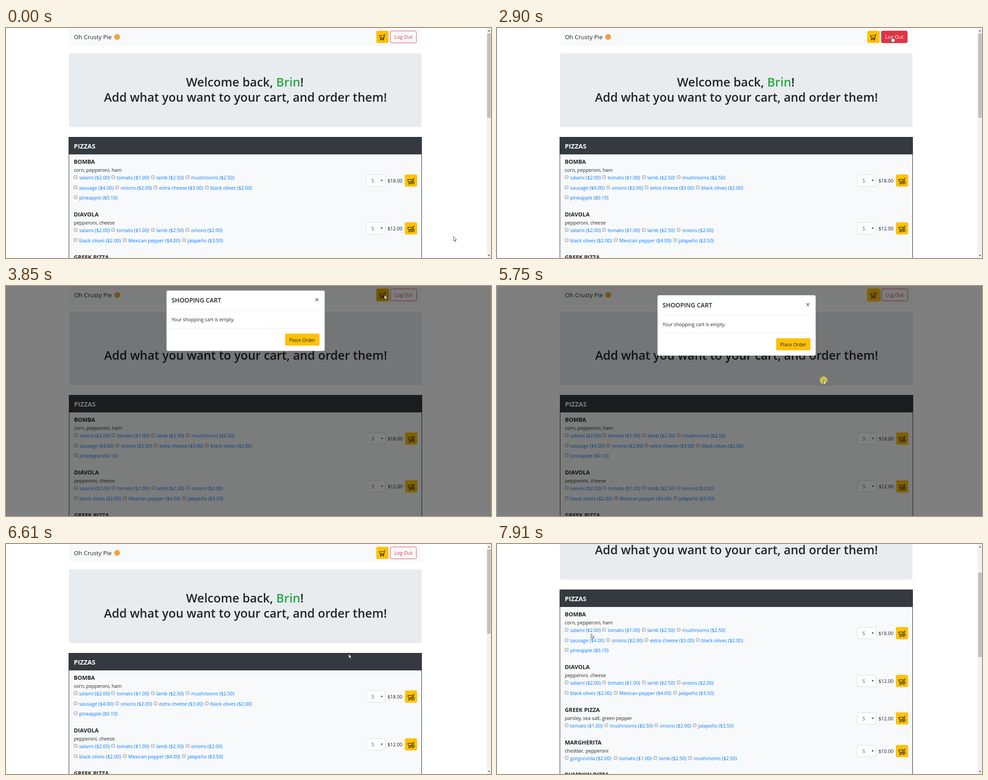
Recreate the animation shown at these times as an HTML page. Size 1087 by 515 pixels, loop 7990 ms.

```html
<!DOCTYPE html>
<html lang="en">
<head>
<meta charset="utf-8">
<title>Pizza order page</title>
<style>
  html, body { margin: 0; width: 100%; height: 100%; overflow: hidden; background: #fff; }
  svg { display: block; }
  text { font-family: "Open Sans", "Noto Sans", sans-serif; white-space: pre; }
</style>
</head>
<body>
<svg id="stage" width="1087" height="515" viewBox="0 0 1087 515"></svg>
<script>
const LOOP = 7990;
const INK = '#212529', LINK = '#007bff', YELLOW = '#ffc107', RED = '#dc3545';

// Each topping is [text x, label]; each inner list is one row.
const MENU = [
  { name: 'BOMBA', desc: 'corn, pepperoni, ham', price: '$18.00', rows: [
    [[164, 'salami ($2.00)'], [248, 'tomato ($1.00)'], [337, 'lamb ($2.50)'], [415, 'mushrooms ($2.50)']],
    [[164, 'sausage ($4.00)'], [257, 'onions ($2.00)'], [343, 'extra cheese ($3.00)'], [458, 'black olives ($2.00)']],
    [[164, 'pineapple ($0.10)']]] },
  { name: 'DIAVOLA', desc: 'pepperoni, cheese', price: '$12.00', rows: [
    [[164, 'salami ($2.00)'], [248, 'tomato ($1.00)'], [337, 'lamb ($2.50)'], [415, 'onions ($2.00)']],
    [[164, 'black olives ($2.00)'], [274, 'Mexican pepper ($4.00)'], [407, 'jalapeño ($3.50)']]] },
  { name: 'GREEK PIZZA', desc: 'parsley, sea salt, green pepper', price: '$12.00', rows: [
    [[164, 'tomato ($1.00)'], [253, 'mushrooms ($2.50)'], [365, 'onions ($2.00)'], [451, 'jalapeño ($3.50)']]] },
  { name: 'MARGHERITA', desc: 'cheddar, pepperoni', price: '$10.00', rows: [
    [[164, 'gorgonzola ($2.00)'], [274, 'tomato ($1.00)'], [363, 'lamb ($2.50)'], [441, 'mushrooms ($2.50)']]] },
  { name: 'PUMPKIN PIZZA', desc: '', price: '', rows: [] }
];

const text = (x, y, str, { size = 10.7, fill = INK, weight = 400, anchor = 'start', id = '' } = {}) =>
  `<text id="${id}" x="${x}" y="${y}" font-size="${size}" fill="${fill}" font-weight="${weight}" text-anchor="${anchor}">${str}</text>`;
const rect = (x, y, w, h, fill, extra = '') =>
  `<rect x="${x}" y="${y}" width="${w}" height="${h}" fill="${fill}" ${extra}/>`;

const cartIcon = (x, y) => `<g transform="translate(${x} ${y})" fill="none" stroke="${INK}" stroke-width="1.2">
  <path d="M7.3-6H5L3 3.8H-5M-6.5-3.5H4.4L3.4 1.4H-5Z"/><circle cx="-3.8" cy="5.8" r=".9"/><circle cx="1.8" cy="5.8" r=".9"/></g>`;

const cartPlusIcon = (x, y) => `<g transform="translate(${x} ${y})" fill="none" stroke="${INK}" stroke-width="1.2">
  <path d="M8-6H5.8L5-2M-7.5-3.8H5.2M-7.5-3.8L-5.8 1.4H0M-5.5 4H0"/>
  <circle cx="-4" cy="6" r=".9"/><circle cx="3.6" cy="2.4" r="3.7"/><path d="M1.6 2.4H5.6M3.6 .4V4.4"/></g>`;

function topping(x, y, label) {
  return rect(x - 11.5, Math.round(y) - 8.5, 7, 7, '#e6e6e6', 'rx="1" stroke="#999"') + text(x, y, label, { fill: LINK });
}

function menuItem(item, y) {
  const middle = Math.round(y + 4.1 + 11.4 * item.rows.length);
  let out = text(152, y, item.name, { size: 12.6, weight: 700 }) + text(152, y + 18, item.desc);
  item.rows.forEach((row, i) => {
    for (const [x, label] of row) out += topping(x, y + 35 + 22.8 * i, label);
  });
  if (!item.price) return out;
  return out +
    rect(807.5, middle - 13.5, 42, 26, '#fff', 'rx="3" stroke="#ced4da" stroke-width=".8"') +
    text(819, middle + 4.3, 'S', { fill: '#495057' }) +
    `<path d="M839.8 ${middle - 2}h4.6l-2.3 3.6z" fill="#343a40"/>` +
    text(855, middle + 4.3, item.price) +
    rect(894, middle - 14, 27.4, 27.2, YELLOW, 'rx="3"') + cartPlusIcon(907.7, middle + 1);
}

function menu() {
  let y = 303.7, out = '';
  for (const item of MENU) {
    out += menuItem(item, y);
    y += 50 + 22.8 * item.rows.length;
  }
  return out;
}

const page = `<g id="page">
  ${rect(141, 0, 790.5, 40, '#f8f9fa')}
  ${text(152.2, 25.3, 'Oh Crusty Pie', { size: 13.4 })}
  <circle cx="249" cy="20" r="6.5" fill="#f0a33c"/>
  ${rect(829.2, 5.2, 29.4, 29.4, 'none', `id="ring" rx="4" stroke="${YELLOW}" stroke-opacity=".5" stroke-width="2.2"`)}
  ${rect(830, 6.2, 27.5, 27.3, YELLOW, 'id="cart" rx="3"')}${cartIcon(843.7, 20.5)}
  ${rect(861.4, 6.6, 58.4, 26.6, RED, `id="logout" rx="3" stroke="${RED}" stroke-width=".9"`)}
  ${text(890.6, 24.3, 'Log Out', { size: 11, anchor: 'middle', id: 'logoutText' })}
  ${rect(141, 57, 790.5, 165, '#e9ecef', 'rx="4"')}
  ${text(403.6, 131, 'Welcome back, <tspan fill="#28a745">Brin</tspan>!', { size: 27, weight: 600 })}
  ${text(536.5, 165, 'Add what you want to your cart, and order them!', { size: 26.9, weight: 600, anchor: 'middle' })}
  ${rect(141, 244.5, 790.5, 700, '#f8f9fa', 'stroke="#212529"')}
  ${rect(141, 244.5, 790.5, 38, '#343a40', 'stroke="#212529" stroke-width=".8"')}
  ${text(152, 269.6, 'PIZZAS', { size: 14.4, weight: 700, fill: '#fff' })}
  ${menu()}</g>`;

const scrollbar = `<g id="scrollbar">${rect(1077.5, 0, 9.5, 515, '#f1f1f1')}
  ${rect(1078.3, 12, 8.2, 189, '#c1c1c1', 'id="thumb"')}
  <path d="M1080 7.5h5l-2.5-3zM1080 508h5l-2.5 3z" fill="#505050"/></g>`;

const modal = `<g id="modal">
  ${rect(359.6, 0, 354.8, 135.4, '#fff', 'rx="3.5" stroke="#000" stroke-opacity=".2" stroke-width=".7"')}
  ${text(371, 27.4, 'SHOOPING CART', { size: 13.8, weight: 600 })}
  ${text(696.5, 27, '×', { size: 17, weight: 700, fill: '#7f7f7f', anchor: 'middle' })}
  ${rect(360, 44, 354, .8, '#e9ecef')}
  ${text(371, 69.4, 'Your shopping cart is empty.')}
  ${rect(360, 84, 354, .8, '#e9ecef')}
  ${rect(625.6, 96.4, 77, 27, YELLOW, 'rx="3"')}
  ${text(664, 114.8, 'Place Order', { anchor: 'middle' })}</g>`;

const pointer = `<g id="pointer">
  <circle id="press" cy="0" r="8.7" fill="#ffee30" fill-opacity=".62"/>
  <path id="arrow" d="M0 0V9.6L2.2 7.6L3.9 11.3L5.5 10.6L3.9 7.1H6.8Z" fill="#fff" stroke="#222" stroke-width=".8"/>
  <path id="hand" d="M-1.1 6V.3Q0-1 1.1.3V4Q2.3 3.3 3 4.3Q4.2 3.8 4.7 4.8Q6 4.5 6 5.8V8.4L4.9 11.7H-.7L-3.5 7.4Q-3.4 5.6-1.1 7.2Z" fill="#fff" stroke="#222" stroke-width=".8"/></g>`;

document.getElementById('stage').innerHTML =
  page + scrollbar + rect(0, 0, 1087, 515, '#000', 'id="backdrop"') + modal + pointer;

const part = id => document.getElementById(id);
const set = (id, attrs) => { for (const key in attrs) part(id).setAttribute(key, attrs[key]); };
const show = (id, on) => { part(id).style.display = on ? '' : 'none'; };

const progress = (t, start, length) => Math.min(1, Math.max(0, (t - start) / length));
const smooth = p => p * p * (3 - 2 * p);
const easeOut = p => 1 - (1 - p) ** 1.7;
const between = (t, a, b) => t >= a && t < b;
const mix = (from, to, p) => `rgb(${from.map((v, i) => Math.round(v + (to[i] - v) * p))})`;

// Pointer stops: [time, x, y]
const PATH = [
  [0, 1003, 467], [70, 1003, 467], [600, 632, 52], [820, 672, 82], [1250, 536, 142], [1670, 590, 112],
  [2350, 890, 22], [2520, 886, 20], [3000, 886, 20], [3400, 848, 20], [3850, 848, 20],
  [4400, 598, 62], [4750, 418, 40], [5000, 480, 126], [5240, 560, 150],
  [5680, 732, 211], [5800, 732, 211], [6140, 801, 256], [6500, 790, 250],
  [7140, 513, 203], [7680, 245, 205], [7910, 211, 201], [LOOP, 211, 201]
];

function pointerAt(t) {
  const i = PATH.findIndex(stop => stop[0] > t);
  const [t0, x0, y0] = PATH[i - 1], [t1, x1, y1] = PATH[i];
  const p = smooth((t - t0) / (t1 - t0));
  return [x0 + (x1 - x0) * p, y0 + (y1 - y0) * p];
}

function draw(t) {
  const scroll = Math.round(71.2 * (smooth(progress(t, 6958, 210)) + smooth(progress(t, 7260, 210))));
  const hasScrollbar = !between(t, 3530, 6210);
  set('page', { transform: `translate(${hasScrollbar ? 0 : .5} ${-scroll})` });
  set('thumb', { y: 12 + scroll * .367 });
  show('scrollbar', hasScrollbar);

  const logoutHover = progress(t, 2560, 150) - progress(t, 3190, 150);
  set('logout', { 'fill-opacity': logoutHover });
  set('logoutText', { fill: mix([220, 53, 69], [255, 255, 255], logoutHover) });
  const cartHover = progress(t, 3230, 150) - progress(t, 3900, 150);
  set('cart', { fill: mix([255, 193, 7], [224, 168, 0], cartHover) });
  show('ring', between(t, 3480, 5780));

  const dim = progress(t, 3540, 150) - progress(t, 6056, 150);
  set('backdrop', { opacity: dim * .5 });
  const slide = easeOut(progress(t, 3697, 300)) - easeOut(progress(t, 5770, 290));
  const fade = progress(t, 3697, 150) - progress(t, 5770, 150);
  set('modal', { transform: `translate(0 ${20.5 - 35.6 * (1 - slide)})`, opacity: fade });

  const [x, y] = pointerAt(t);
  const isHand = between(t, 2330, 3560);
  set('pointer', { transform: `translate(${x} ${y})` });
  show('hand', isHand);
  show('arrow', !isHand);
  show('press', between(t, 3430, 3520) || between(t, 5690, 5780));
}

const startTime = performance.now();
function frame(now) {
  draw(Math.max(0, now - startTime) % LOOP);
  requestAnimationFrame(frame);
}
draw(0);
requestAnimationFrame(frame);
</script>
</body>
</html>
```
